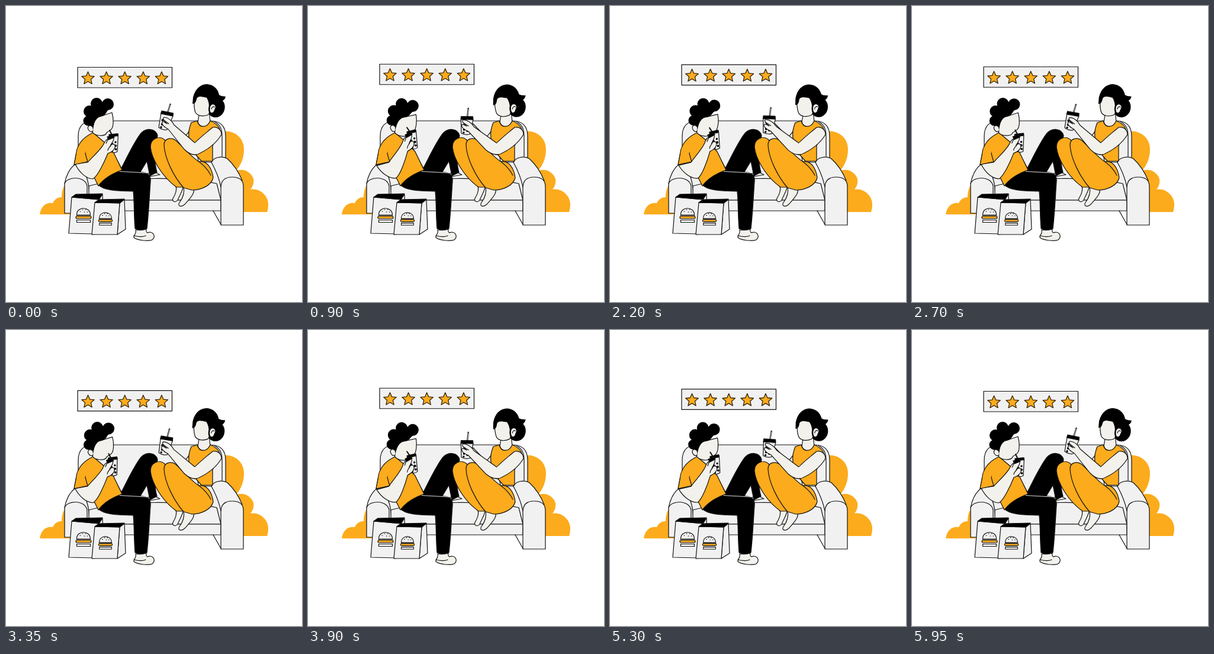
Write an HTML page that moves like this. It is 500 px wide and 500 px high and loops after 6050 ms.

```html
<!DOCTYPE html>
<html lang="en">
<head>
<meta charset="utf-8">
<title>Bubble tea on the sofa</title>
<style>
  html, body { margin: 0; width: 100%; height: 100%; overflow: hidden; background: #fff; }
  svg { display: block; width: 100%; height: 100%; }
  .line { fill: none; stroke: #111; stroke-width: 1.2; stroke-linejoin: round; stroke-linecap: round; }
  .sofa { fill: #f1f1f1; }
  .skin { fill: #f2f1ec; }
  .gold { fill: #fcab1c; }
  .ink { fill: #000; }
  .flat { stroke: none; }
</style>
</head>
<body>
<svg viewBox="0 0 500 500">
  <defs>
    <g id="burger">
      <path class="sofa" d="M-11.5 5C-12-10 11.5-10 11.5 5Z"/>
      <path d="M-6-1h1M-2-4h1M3-4h1M6 0h1M1 0h1"/>
      <rect class="gold" x="-13" y="7" width="26" height="4" rx="2"/>
      <path d="M-12 6H12"/>
      <path class="sofa" d="M-11.5 13.500H11.500V17.500H-11.500Z"/>
    </g>
    <g id="pearls" class="ink flat">
      <circle cx="-3" cy="13" r="2"/><circle cx="3" cy="10" r="1.700"/>
      <circle cx="3" cy="16" r="2.100"/><circle cx="-2" cy="20" r="1.900"/>
      <circle cx="3.500" cy="22" r="1.800"/><circle cx="-2.500" cy="25" r="1.700"/>
    </g>
  </defs>

  <!-- bushes -->
  <g class="gold">
    <path d="M57 352C59 338 68 331 79 333C82 326 88 323 94 323C94 314 96 306 102 298L110 352Z"/>
    <path d="M360 212C385 208 402 222 402 242C402 258 396 270 388 279C400 273 414 280 418 292C419 299 417 305 413 310C428 307 443 320 443 335C443 341 442 345 441 348H395Z"/>
  </g>

  <!-- sofa -->
  <g class="line">
    <path class="sofa" d="M122 290V220C122 203 131 194 148 194H345C362 194 371 203 371 220V330H122Z"/>
    <path d="M352 195C361 200 365 207 365 220V254"/>
    <path class="sofa" d="M99 350V300C101 287 108 274 116 268C130 272 140 285 141 322V350Z"/>
    <path d="M99 300C103 288 133 286 137 304V322"/>
    <path class="sofa" d="M140 304C200 288 300 288 356 300L363 328H140Z"/>
    <path class="sofa" d="M140 328H363V346H140Z"/>
    <path class="sofa" d="M347 264C350 256 365 252 374 258C385 268 393 280 399 295L363 306C360 290 353 275 347 264Z"/>
    <path class="sofa" d="M363 370V307C363 294 371 289 382 289C394 289 401 294 401 305V370Z"/>
    <path d="M350 346L363 369"/>
  </g>

  <!-- man: body and legs -->
  <g class="line">
    <path class="skin" d="M180 246L196 276L186 280Z"/>
    <path class="skin" d="M236 284L250 280L260 285L243 288Z"/>
    <path class="ink" d="M192 280C203 258 215 232 227 216C236 205 253 206 256 219C253 240 248 254 255 281L243 287L238 262L226 282Z"/>
    <path class="ink" d="M156 302C167 287 182 279 194 279L232 281C241 282 245 287 244 297C242 325 241 350 238 376C232 379 224 379 218 376C216 355 217 334 215 313C195 312 166 313 156 302Z"/>
    <path d="M192 279.500L238 282" style="stroke:#eee;stroke-width:.9"/>
    <path class="skin" d="M219 378C225 379 231 379 237 377C236 382 238 384 242 382C250 382 253 390 247 395C240 398 222 396 216 391C215 387 221 385 219 378Z"/>
    <path d="M216 388C224 390 230 391 236 388"/>
    <path class="gold" d="M147 214C134 220 124 229 120 242L115 268L133 265C143 278 150 291 156 304C165 291 182 282 196 277L181 246L166 230Z"/>
  </g>

  <!-- man: head -->
  <g id="manHead">
    <path class="skin line" d="M149 190L179 180C182 190 182 204 178 208C175 212 171 212 170 214C168 221 150 220 146 213Z"/>
    <g class="ink">
      <path d="M138 176L155 163L176 171C171 179 166 183 158 187C151 191 149 197 147 207L138 200Z"/>
      <circle cx="153" cy="165" r="10"/><circle cx="172" cy="166" r="10"/>
      <circle cx="141" cy="178" r="10"/><circle cx="139" cy="194" r="8.500"/>
      <circle cx="158" cy="174" r="13"/>
    </g>
    <path class="skin line" d="M146 204C140 199 136 205 140 210C142 213 145 213 147 211"/>
  </g>

  <!-- man: cup and forearm -->
  <g id="manCup" class="line">
    <path d="M179 218L175 210" style="stroke-width:2"/>
    <path class="sofa" d="M175 219L189.500 217L188 246C184 248.500 179 248 176 245Z"/>
    <path class="ink" d="M174 217L189 215.500V219.500L174 221Z"/>
    <use href="#pearls" x="182" y="220"/>
  </g>
  <g id="manArm" class="line">
    <path class="skin" d="M117 267C123 280 135 292 147 292C155 287 166 264 172 249C181 246 187 239 183 234C181 232 178 234 176 236C180 230 184 224 181 222C176 221 169 225 166 231C163 240 148 253 138 264Z"/>
    <path d="M177 236C173 240 172 242 172 244M172 226L169 232"/>
    <path class="ink" d="M171 221L181 218L183 222L173 226Z"/>
  </g>
  <path class="gold line" d="M120 242L115 268L138 263C135 254 133 247 133 240"/>
  <path class="gold flat" d="M121 240L134 236L134 248L119 249Z"/>

  <!-- bags -->
  <g class="line">
    <path class="sofa" d="M157 327L163 318L165 384L146 386Z"/>
    <path class="sofa" d="M111 323L157 327L150 385L106 384Z"/>
    <path class="ink" d="M111 323L118 318L163 317L157 327Z"/>
    <use href="#burger" x="131" y="348"/>
    <path class="sofa" d="M192 333L200 327L202 377L188 386Z"/>
    <path class="sofa" d="M150 332L192 333L188 386L145 386Z"/>
    <path class="ink" d="M150 332L157 327L200 326L192 333Z"/>
    <use href="#burger" transform="translate(168 354.500) scale(.9)"/>
  </g>

  <!-- woman: body and legs -->
  <g class="line">
    <path class="skin" d="M314 204C307 215 304 220 300 221L279 199L272 205L296 231L316 228Z"/>
    <path class="skin" d="M326 184L324 196C328 208 340 206 345 196L343 176Z"/>
    <path class="skin" d="M322 240L346 240L347 264L325 263Z"/>
    <path class="gold" d="M313 197L323 194C326 206 339 207 345 194C355 198 361 205 362 212L349 236V262H330L316 246C309 228 305 216 313 197Z"/>
    <path class="skin" d="M287 304L300 301C300 310 294 318 290 328C286 333 280 330 282 325C287 317 289 311 287 304Z"/>
    <path class="skin" d="M300 305L317 308C319 318 311 324 303 334C296 341 289 338 293 332C299 324 302 315 300 305Z"/>
    <path class="gold" d="M244 238C244 224 259 218 268 226L302 306L288 306C263 288 246 258 244 238Z"/>
    <path class="gold" d="M267 235C267 222 281 221 289 229C303 243 316 257 326 263C339 260 348 274 350 290C347 303 330 311 314 311L300 307C283 288 268 257 267 235Z"/>
    <path d="M326 263C334 269 342 278 346 286"/>
  </g>

  <!-- woman: cup and arm -->
  <path class="skin line" d="M349 205C357 203 364 209 364 217C356 231 340 244 322 251C315 252 309 248 309 243C316 231 335 217 349 205Z"/>
  <g id="womanCup" class="line">
    <path d="M273.500 179L277.500 166" style="stroke-width:2.400"/>
    <path d="M274 178L277.300 167" style="stroke:#eee;stroke-width:.8"/>
    <path class="sofa" d="M262 181L282 186L272 209C267 210 262 208 258 205Z"/>
    <path class="ink" d="M263 177L282.500 181L282 186L261.500 182Z"/>
    <g transform="translate(270.500 181) rotate(14)"><use href="#pearls"/></g>
  </g>
  <g id="womanArm" class="line">
    <path class="skin" d="M322 251C315 252 307 248 301 242L274 208C268 205 262 200 264 196C266 194 270 198 272 199C266 194 264 189 267 188C273 188 281 194 284 201L319 231"/>
    <path d="M267 193L275 199"/>
  </g>
  <path class="skin flat" d="M320 231L338 219L345 232L324 250L311 247L308 241Z"/>

  <!-- woman: head -->
  <g id="womanHead">
    <path class="skin line" d="M321 148C317 159 317 172 320 180C324 186 333 187 341 184L352 170L342 148Z"/>
    <g class="ink">
      <path d="M316 154C320 139 329 132 340 132C351 133 358 140 360 150C364 153 367 152 371 153C370 157 368 159 366 160C372 167 370 178 365 183C359 190 349 190 343 183C342 173 345 165 339 155C331 153 324 151 322 157C321 163 318 166 315 165Z"/>
      <circle cx="355" cy="174" r="13"/>
    </g>
    <path class="skin" d="M345 178C343 170 347 164 352 167C356 171 352 174 351 178C349 181 346 181 345 178Z"/>
    <path class="line" d="M347 174C348 170 351 169 352 171"/>
  </g>

  <!-- rating -->
  <g id="rating" class="line">
    <rect class="sofa" x="121" y="103.500" width="159.500" height="34.500"/>
    <g id="stars" class="gold" style="stroke:#33240c;stroke-width:1.300"></g>
  </g>
</svg>

<script>
  const $ = id => document.getElementById(id);
  const STEP = 50, LOOP = 6050, CYCLE = 3000;

  function star(cx, cy, r) {
    const pts = [];
    for (let i = 0; i < 10; i++) {
      const a = i * Math.PI / 5 - Math.PI / 2, q = i % 2 ? r * 0.46 : r;
      pts.push((cx + q * Math.cos(a)).toFixed(2) + ',' + (cy + q * Math.sin(a)).toFixed(2));
    }
    return `<polygon points="${pts.join(' ')}"/>`;
  }
  $('stars').innerHTML = [0, 1, 2, 3, 4].map(i => star(138.5 + i * 31.1, 122.3, 11.3)).join('');

  function ramp(t, from, to) {
    const u = Math.min(1, Math.max(0, (t - from) / (to - from)));
    return u * u * (3 - 2 * u);
  }

  function pose(id, k, dx, dy, angle, px, py) {
    $(id).setAttribute('transform',
      `translate(${dx * k} ${dy * k}) rotate(${angle * k} ${px} ${py})`);
  }

  function draw(now) {
    const t = Math.min(LOOP - 2 * STEP, Math.floor(now % LOOP / STEP) * STEP);
    const c = t % CYCLE;
    const lift = (1 - Math.cos(c / CYCLE * 2 * Math.PI)) / 2;
    const sip = ramp(c, 100, 950) - ramp(c, 2000, 2850);

    pose('rating', lift, 0, -8, 0, 0, 0);
    pose('manHead', sip, 0, 0, 6, 148, 215);
    pose('manCup', sip, -5, -6, -8, 182, 232);
    pose('manArm', sip, 0, 0, -7, 138, 277);
    pose('womanHead', sip, 0, 0, -4.5, 345, 195);
    pose('womanCup', sip, -1.5, 8, -11, 270, 193);
    pose('womanArm', sip, 0, 0, -5, 316, 246);
  }

  const start = performance.now();
  function tick() {
    draw(performance.now() - start);
    requestAnimationFrame(tick);
  }
  draw(0);
  requestAnimationFrame(tick);
</script>
</body>
</html>
```
